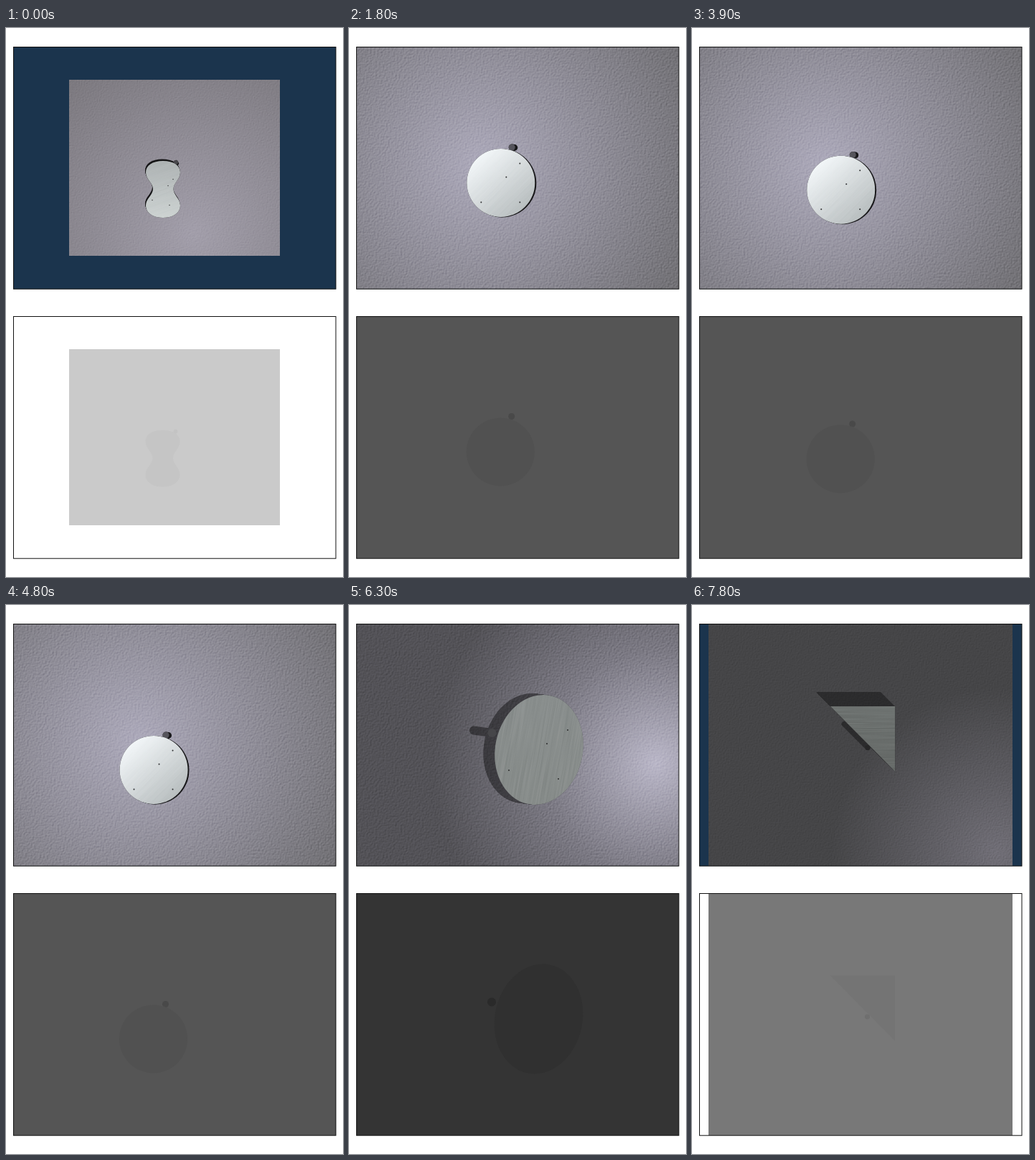
Write an HTML page that moves like this. It is 470x764 px and loops after 8000 ms.

```html
<!DOCTYPE html>
<html lang="en">
<head>
<meta charset="utf-8">
<title>Pushed objects</title>
<style>
html, body { margin: 0; width: 100%; height: 100%; overflow: hidden; background: #fff; }
svg { display: block; width: 470px; height: 764px; }
.blend { mix-blend-mode: overlay; }
</style>
</head>
<body>
<svg id="stage" viewBox="0 0 470 764" xmlns="http://www.w3.org/2000/svg"></svg>
<script>
const LOOP = 8000, STEP = 300;
const stage = document.getElementById('stage');

const ellipse = (rx, ry) => `M${-rx} 0A${rx} ${ry} 0 1 1 ${rx} 0A${rx} ${ry} 0 1 1 ${-rx} 0Z`;
const peanut = 'M0-39.5C15-39.5 24-33 24-23.5S14.5-9 14.5-.5S24 13 24 22.5S15 39.5 0 39.5' +
  'S-24 32-24 22.5S-14 8-14-.5S-24-14-24-23.5S-15-39.5 0-39.5Z';

// pose: x, y, rotation, pusher x, pusher y at time t; drift: change of pose per step
// glow: centre, radius, then colours from the inside out; shine: direction of the metal gradient
const scenes = [
  {
    from: 0, t: 0, view: [88, 72, 294, 245], zoom: .72, grain: .2,
    glow: [262, 285, 270, '#a29eaa', '#7c797f'], flat: '#cacaca', mark: '#c5c5c5', knob: '#c3c3c3',
    shape: peanut, metal: ['#adb2b3', '#cdd3d2'], shine: [0, 40], brush: -20,
    pose: [219, 224.5, 0, 237, 187], drift: [-.6, .7, -2, -5, -.6], lift: 5,
    cast: [-1, -2.5], dark: .85, stick: [1, 1.5], head: [3, '#49484d'],
    dots: [[14, -14], [7, -5], [-15, 15], [9, 22]]
  },
  {
    from: 1800, t: 3000, view: [11, 27, 449, 336], zoom: 1, grain: .28,
    glow: [185, 190, 330, '#adaabb', '#706f73'], flat: '#555', mark: '#515151', knob: '#494949',
    shape: ellipse(47.5, 47.5), metal: ['#f2f6f8', '#b9bfc0'], shine: [30, 36], brush: -45,
    pose: [209.5, 221, 0, 225.5, 172], drift: [-.58, 1.4, 0, -.42, 1.5],
    cast: [2, .5], dark: .85, stick: [3.5, .5], head: [4.5, '#55545b'],
    dots: [[26.5, -27], [7.5, -8], [-27.5, 27], [26.5, 27]]
  },
  {
    from: 5100, t: 5100, view: [11, 27, 449, 336], zoom: 1, grain: .28,
    glow: [470, 50, 260, '#5f5e67', '#424244'], flat: '#2d2d2d', mark: '#292929', knob: '#232323',
    shape: ellipse(65, 81.5), metal: ['#6b6f6e', '#646867'], shine: [0, 82], brush: 88,
    pose: [226.5, 211, 0, 157, 184], drift: [.6, 0, 0, 1, 0],
    cast: [-51.5, 39], dark: .32, stick: [-84, 65], head: [6, '#1e1e1f'],
    dots: [[36.5, -38], [10.5, -11], [-37.5, 37], [36.5, 36]]
  },
  {
    from: 5700, t: 6300, view: [11, 27, 449, 336], zoom: 1, grain: .28,
    glow: [428, 220, 310, '#bab7c8', '#7c7a84', '#535257'], flat: '#343434', mark: '#303030', knob: '#2a2a2a',
    shape: ellipse(61, 77), metal: ['#898e8d', '#868b89'], shine: [0, 77], brush: -80,
    pose: [265, 201.5, 12, 199.5, 178], drift: [.8, 0, 0, 1, 0],
    cast: [-16, -2], dark: .42, stick: [-25.5, -3.5], head: [6, '#464649'],
    dots: [[40, -27.5], [11, -8.5], [-42, 28.5], [27, 40.5]]
  },
  {
    from: 7200, t: 7800, view: [23, 27, 424, 336], zoom: .8, grain: .22,
    glow: [425, 345, 230, '#706e76', '#454547'], flat: '#787878', mark: '#747474', knob: '#6f6f6f',
    shape: 'M-60.5-30.5H30V60.5Z', metal: ['#707573', '#656967'], shine: [0, 60], brush: 0,
    pose: [253.5, 171.5, 0, 245, 198.5], drift: [.5, -.5, 0, .5, -.5],
    cast: [-20, -20], dark: .36, stick: [-33, -33], head: [3.5, '#262627'],
    dots: []
  }
];

const filters = `
  <filter id="grain" x="0" y="0" width="100%" height="100%" color-interpolation-filters="sRGB">
    <feTurbulence type="fractalNoise" baseFrequency=".4" numOctaves="2" seed="4"/>
    <feDiffuseLighting surfaceScale="1.2" diffuseConstant=".707" lighting-color="#fff">
      <feDistantLight azimuth="225" elevation="45"/>
    </feDiffuseLighting>
  </filter>
  <filter id="brush" x="0" y="0" width="100%" height="100%" color-interpolation-filters="sRGB">
    <feTurbulence type="fractalNoise" baseFrequency=".012 .5" numOctaves="2" seed="9"/>
    <feColorMatrix values=".7 0 0 0 .15 .7 0 0 0 .15 .7 0 0 0 .15 0 0 0 0 1"/>
  </filter>`;

const rect = (x, y, w, h, attrs) => `<rect x="${x}" y="${y}" width="${w}" height="${h}" ${attrs}/>`;
const panel = (y, attrs) => rect(10.5, y, 449.5, 336.7, attrs);
const stops = colors =>
  colors.map((c, k) => `<stop offset="${k / (colors.length - 1)}" stop-color="${c}"/>`).join('');

// Sweeps the outline along the light direction
function castShadow(i, [dx, dy]) {
  const n = Math.ceil(Math.max(Math.abs(dx), Math.abs(dy)));
  let out = '';
  for (let k = 0; k <= n; k++) out += `<use href="#shape${i}" x="${dx * k / n}" y="${dy * k / n}"/>`;
  return out;
}

function sceneDefs(s, i) {
  const [cx, cy, r, ...colors] = s.glow, [x, y, w, h] = s.view, [sx, sy] = s.shine;
  return `
    <radialGradient id="glow${i}" gradientUnits="userSpaceOnUse" cx="${cx}" cy="${cy}" r="${r}">${stops(colors)}</radialGradient>
    <linearGradient id="metal${i}" gradientUnits="userSpaceOnUse" x1="${-sx}" y1="${-sy}" x2="${sx}" y2="${sy}">${stops(s.metal)}</linearGradient>
    <path id="shape${i}" d="${s.shape}"/>
    <clipPath id="cut${i}"><use href="#shape${i}"/></clipPath>
    <clipPath id="view${i}">${rect(x, y, w, h, '')}</clipPath>`;
}

function sceneMarkup(s, i) {
  const [x, y, w, h] = s.view, z = s.zoom, [r, color] = s.head;
  const dotSize = z === 1 ? 1 : .7;
  const dots = s.dots.map(([a, b]) => `<circle cx="${a}" cy="${b}" r="${dotSize}"/>`).join('');
  const full = attrs => rect(-100, -100, 200, 200, attrs);
  return `<g id="scene${i}" display="none">
    <g clip-path="url(#view${i})">
      <g style="isolation:isolate">
        ${rect(x, y, w, h, `fill="url(#glow${i})"`)}
        <g class="blend" opacity="${s.grain}" transform="translate(${x} ${y}) scale(${z})">
          ${rect(0, 0, w / z, h / z, 'filter="url(#grain)"')}
        </g>
      </g>
      <g opacity="${s.dark}">
        <g class="body">${castShadow(i, s.cast)}</g>
        <path class="pusher" d="M0 0l${s.stick}" stroke="#000" stroke-width="${r * 2}" stroke-linecap="round"/>
      </g>
      <circle class="pusher" r="${r}" fill="${color}"/>
      <g class="body">
        <g clip-path="url(#cut${i})">
          ${full(`fill="url(#metal${i})"`)}
          <g class="blend" opacity=".15" transform="rotate(${s.brush})">${full('filter="url(#brush)"')}</g>
        </g>
        <g class="dots" fill="#2b2c2d">${dots}</g>
      </g>
    </g>
    ${rect(x, y + 375, w, h, `fill="${s.flat}"`)}
    <g transform="translate(-.5 374.5)">
      <circle class="pusher" r="${r}" fill="${s.knob}"/>
      <g class="body" fill="${s.mark}"><use href="#shape${i}"/></g>
    </g>
  </g>`;
}

stage.innerHTML = `<defs>${filters}${scenes.map(sceneDefs).join('')}</defs>
  ${panel(26.5, 'fill="#1b344d"')}
  ${scenes.map(sceneMarkup).join('')}
  <g fill="none" stroke="#111">${panel(26.5, '')}${panel(401.5, '')}</g>`;

const groups = scenes.map((s, i) => document.getElementById('scene' + i));
const move = (root, name, value) =>
  root.querySelectorAll('.' + name).forEach(el => el.setAttribute('transform', value));

function draw(time) {
  const active = scenes.findLastIndex(s => time >= s.from);
  const s = scenes[active], root = groups[active];
  const n = (time - s.t) / STEP;
  let [x, y, turn, px, py] = s.pose.map((p, k) => p + s.drift[k] * n);
  if (s.lift) py -= s.lift * Math.max(0, n * (5 - n)) / 6.25;
  groups.forEach((g, i) => g.setAttribute('display', i === active ? 'inline' : 'none'));
  document.getElementById('shape' + active).setAttribute('transform', `rotate(${turn})`);
  move(root, 'body', `translate(${x} ${y})`);
  move(root, 'pusher', `translate(${px} ${py})`);
  // dot places are given in the scene's resting rotation
  move(root, 'dots', `rotate(${turn - s.pose[2]})`);
}

let start = null, shown = -1;
function tick(now) {
  if (start === null) start = now;
  const time = Math.floor(((now - start) % LOOP) / STEP) * STEP;
  if (time !== shown) draw(shown = time);
  requestAnimationFrame(tick);
}
draw(0);
requestAnimationFrame(tick);
</script>
</body>
</html>
```
